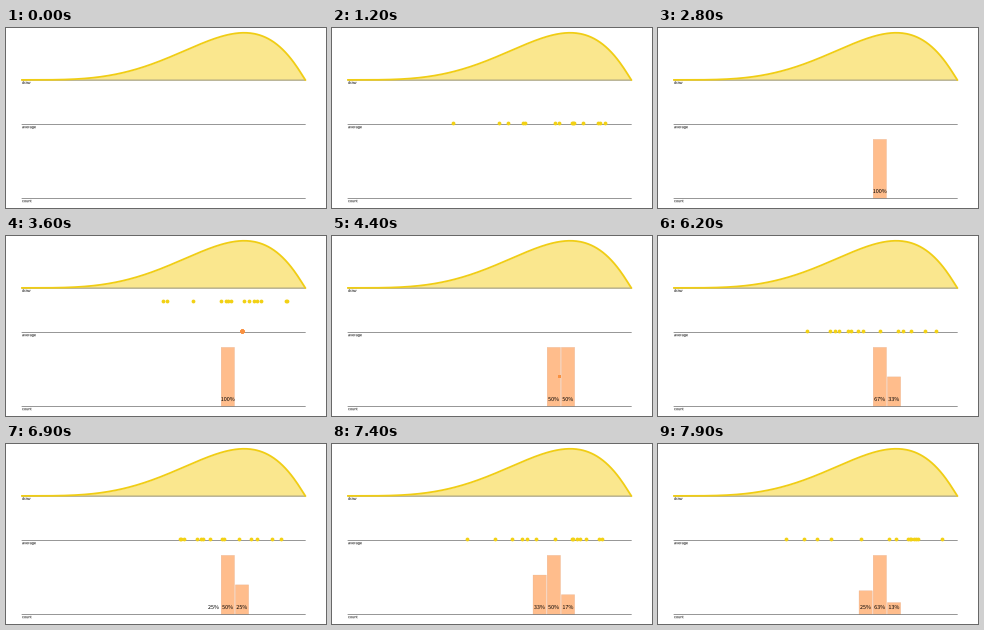
These frames come from a looping animation (320x180 px, 8 s). A matplotlib script:

```python
import numpy as np
import matplotlib.pyplot as plt
from matplotlib.animation import FuncAnimation
from matplotlib.patches import PathPatch, Rectangle
from matplotlib.path import Path
from matplotlib.textpath import TextPath
from matplotlib.transforms import Affine2D

W, H, DPI = 320, 180, 100
PX = 72 / DPI
STEP, FRAMES = 100, 80
LEFT, RIGHT = 16, 299.3
DRAW_Y, AVERAGE_Y, COUNT_Y = 52.1, 96.4, 170.4
REST_Y = 94.5
BIN = (RIGHT - LEFT) / 20
BINS_LEFT = LEFT + 13 * BIN
BAR_H = 59
ALPHA, BETA = 4.85, 2.06
GOLD = np.array([0.95, 0.82, 0.08])
ORANGE = np.array([0.98, 0.57, 0.25])

rng = np.random.default_rng(4)


def smooth(u):
    u = np.clip(u, 0, 1)
    return u * u * (3 - 2 * u)


class Sample:
    def __init__(self, start, duration, bin_index):
        self.start, self.duration, self.bin = start, duration, bin_index
        self.land = start + duration
        self.grow = duration * 0.15 + 60
        # Redraw until the average falls into the wanted bin.
        self.mean = -1
        while int((self.mean - BINS_LEFT) // BIN) != bin_index:
            self.xs = LEFT + (RIGHT - LEFT) * rng.beta(ALPHA, BETA, 14)
            self.mean = self.xs.mean()

    def dots(self, t):
        """Positions, colour and radius, or None when not in flight."""
        u = (t - self.start) / self.duration
        if not 0 < u < 1:
            return None
        fall = min(u / 0.3, 1) ** 2
        gather = smooth((u - 0.52) / 0.28)
        drop = max((u - 0.85) / 0.15, 0) ** 2
        xs = self.xs + (self.mean - self.xs) * gather
        y = DRAW_Y + (REST_Y - DRAW_Y) * fall + (COUNT_Y - REST_Y) * drop
        color = GOLD + (ORANGE - GOLD) * gather
        radius = 1.9 - 0.6 * min(drop * 2, 1)
        return np.column_stack([xs, np.full(len(xs), y)]), color, radius


# Four single draws, then a quick series.
samples = [Sample(start, 1000, k)
           for start, k in [(850, 1), (2800, 2), (3434, 1), (5890, 0)]]
samples += [Sample(6800 + 250 * n, 250, k)
            for n, k in enumerate([1, 0, 1, 1, 1])]


def counts_after(n):
    return np.bincount([s.bin for s in samples[:n]], minlength=3)


def heights_after(n):
    counts = counts_after(n)
    return BAR_H * counts / max(counts.max(), 1)


def text_path(text, x, y, size, family, centered=False):
    """Outline of a text line, free of pixel hinting."""
    if not text:
        return Path(np.empty((0, 2)))
    path = TextPath((0, 0), text, size=size, prop={"family": family})
    if centered:
        x -= path.get_extents().width / 2
    return Affine2D().scale(1, -1).translate(x, y).transform_path(path)


def percent_path(k, text):
    return text_path(text, BINS_LEFT + (k + 0.5) * BIN, 165, 5.4,
                     "Noto Sans CJK JP", centered=True)


fig = plt.figure(figsize=(W / DPI, H / DPI), dpi=DPI, facecolor="white")
ax = fig.add_axes([0, 0, 1, 1])
ax.set(xlim=(0, W), ylim=(H, 0))
ax.axis("off")

u = np.linspace(0, 1, 300)
density = u ** (ALPHA - 1) * (1 - u) ** (BETA - 1)
curve_x = LEFT + (RIGHT - LEFT) * u
curve_y = DRAW_Y - 0.2 - 47.1 * density / density.max()
ax.fill_between(curve_x, curve_y, DRAW_Y, color="#fae78e", lw=0, zorder=1)
for y, label in [(DRAW_Y, "draw"), (AVERAGE_Y, "average"), (COUNT_Y, "count")]:
    ax.plot([LEFT, RIGHT], [y, y], color="#777777", lw=0.75 * PX,
            snap=False, zorder=2)
    ax.add_patch(PathPatch(
        text_path(label, LEFT, y + 3.8, 3.9, "Liberation Sans"),
        fc="black", lw=0, snap=False, zorder=6))
ax.plot(curve_x, curve_y, color="#f0cd14", lw=1.8 * PX, zorder=3)

bars, labels = [], []
for k in range(3):
    bars.append(ax.add_patch(Rectangle(
        (BINS_LEFT + k * BIN + 0.9, COUNT_Y), BIN - 0.9, 0, fc="#ffbd8c",
        ec="#e5ab85", lw=0.3 * PX, snap=False, zorder=1.5)))
    labels.append(ax.add_patch(PathPatch(
        percent_path(k, ""), fc="black", lw=0, snap=False, zorder=6)))
balls = [ax.scatter([], [], lw=0, snap=False, zorder=5) for _ in samples]


def update(i):
    t = i * STEP
    for ball, sample in zip(balls, samples):
        state = sample.dots(t)
        ball.set_visible(state is not None)
        if state:
            points, color, radius = state
            ball.set_offsets(points)
            ball.set_facecolor(color)
            ball.set_sizes([(2 * radius * PX) ** 2])

    landed = sum(s.land <= t for s in samples)
    counts, heights = counts_after(landed), heights_after(landed)
    if landed:
        last = samples[landed - 1]
        before = heights_after(landed - 1)
        heights = before + (heights - before) * smooth((t - last.land) / last.grow)
    for k, (bar, label) in enumerate(zip(bars, labels)):
        bar.set_height(-heights[k])
        bar.set_visible(heights[k] > 0.5)
        share = f"{int(100 * counts[k] / landed + 0.5)}%" if counts[k] else ""
        label.set_path(percent_path(k, share))
        label.set_visible(bool(share))
    return [*balls, *bars, *labels]


anim = FuncAnimation(fig, update, frames=FRAMES, interval=STEP,
                     repeat=True, repeat_delay=0, blit=False)
plt.show()
```
